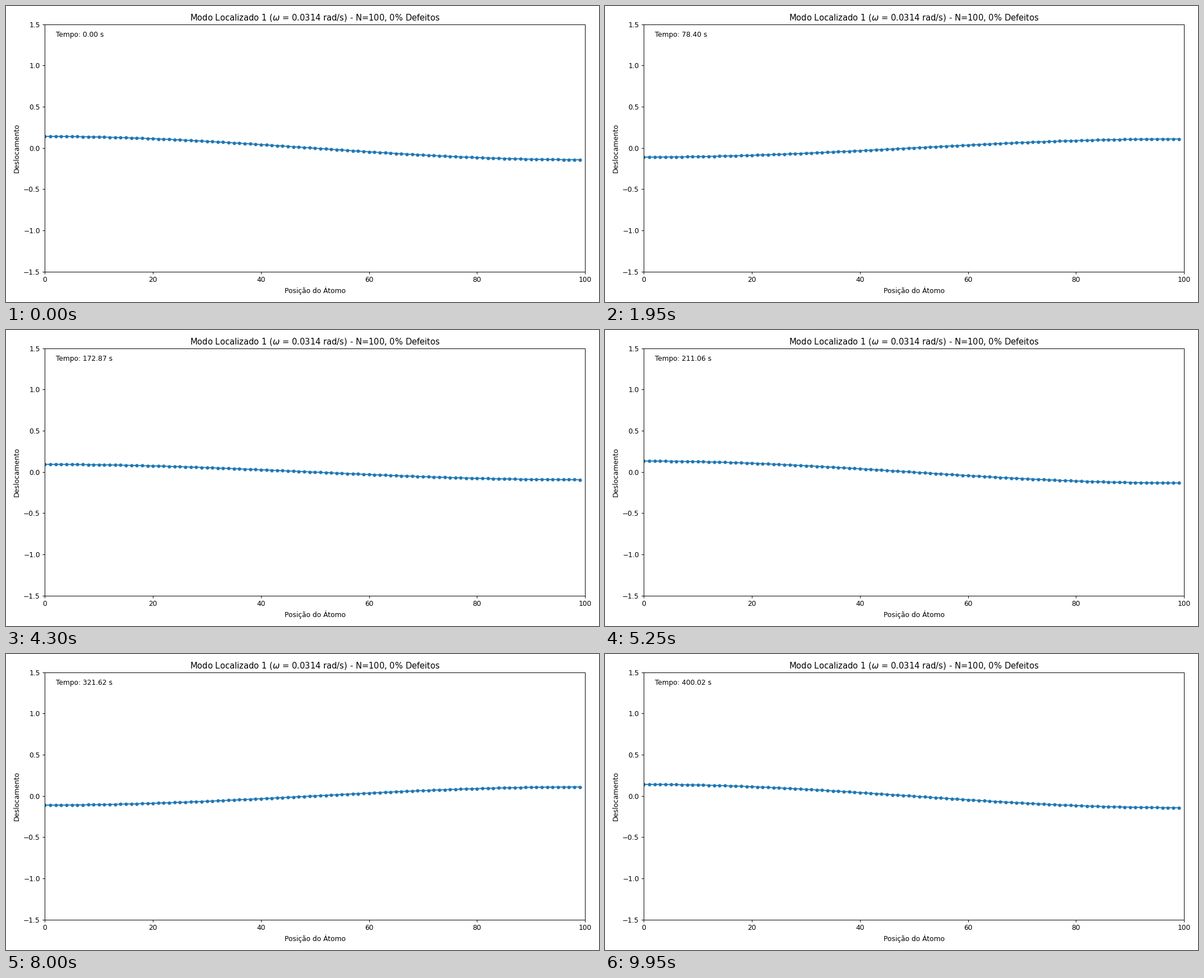
A matplotlib script that plays this animation: 1058x529 px, repeating every 10000 ms.

```python
import numpy as np
import matplotlib.pyplot as plt
from matplotlib.animation import FuncAnimation

W, H = 1058, 529
N = 100
FRAMES, INTERVAL = 200, 50

# First vibrating mode of a free chain of N unit masses and springs
atoms = np.arange(N)
omega = 2 * np.sin(np.pi / (2 * N))
mode = np.sqrt(2 / N) * np.cos(np.pi * (atoms + 0.5) / N)
times = np.linspace(0, 2 * (2 * np.pi / omega), FRAMES)

fig, ax = plt.subplots(figsize=(12, 6), dpi=W / 12)
line, = ax.plot(atoms, mode, "o-", markersize=4, color="#1f77b4")
clock = ax.text(0.02, 0.95, "", transform=ax.transAxes)

ax.set_xlim(0, N)
ax.set_ylim(-1.5, 1.5)
ax.set_xlabel("Posição do Átomo")
ax.set_ylabel("Deslocamento")
ax.set_title(rf"Modo Localizado 1 ($\omega$ = {omega:.4f} rad/s) - N={N}, 0% Defeitos")
fig.tight_layout()
fig.subplots_adjust(top=1 - 32.8 / H)


def update(i):
    t = times[i]
    line.set_ydata(mode * np.cos(omega * t))
    clock.set_text(f"Tempo: {t:.2f} s")
    return line, clock


anim = FuncAnimation(fig, update, frames=FRAMES, interval=INTERVAL,
                     repeat=True, repeat_delay=0)
plt.show()
```
